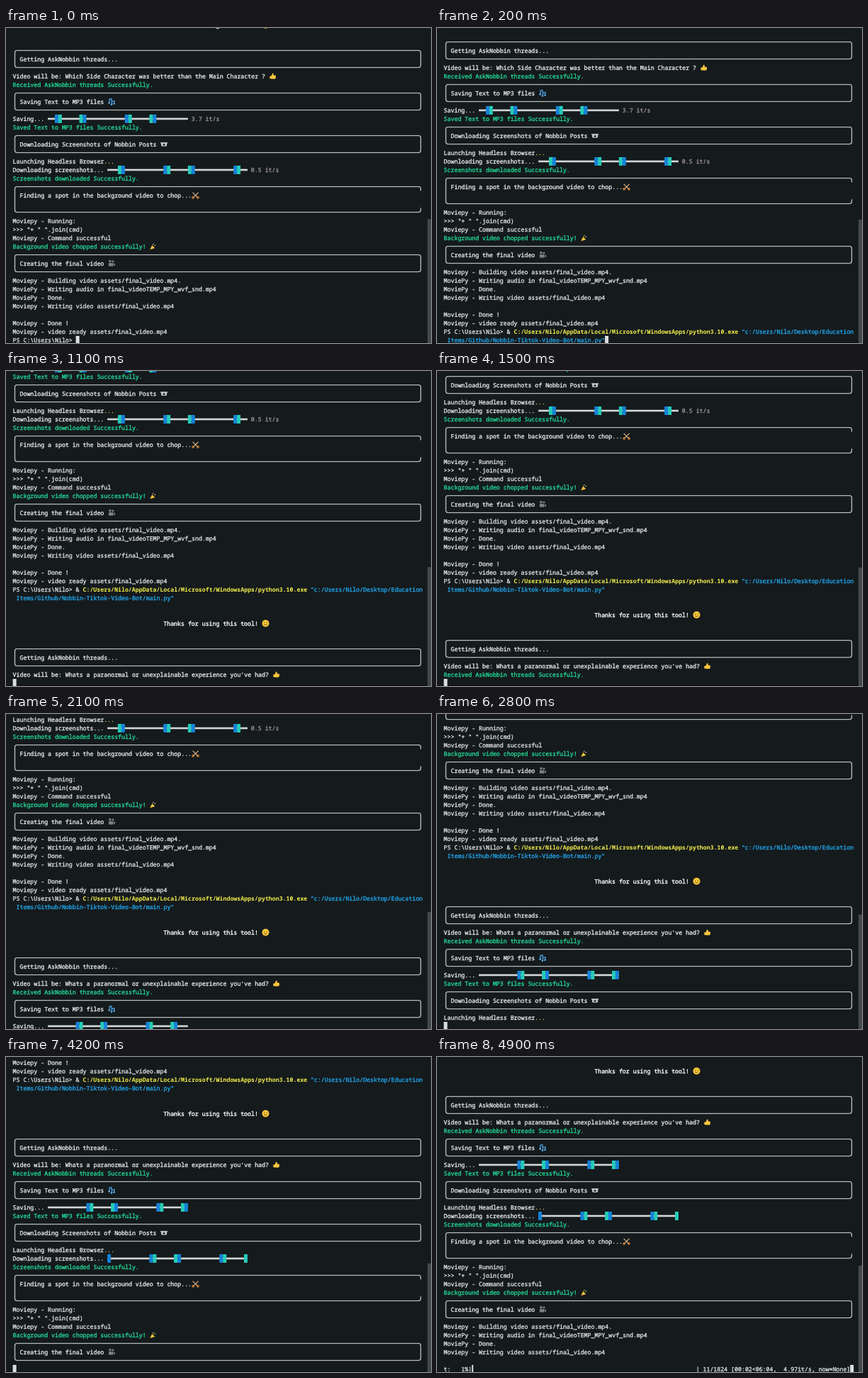
An HTML page that plays this animation: 600x444 px, repeating every 5000 ms.

```html
<!DOCTYPE html>
<html lang="en">
<head>
<meta charset="utf-8">
<title>Terminal</title>
<style>
html, body { margin: 0; width: 100%; height: 100%; overflow: hidden; background: #151a1c; }
svg { display: block; width: 600px; height: 444px; }
text {
  font: 8.25px "Noto Sans Mono", "DejaVu Sans Mono", monospace;
  white-space: pre;
  text-rendering: geometricPrecision;
  fill: currentColor;
  stroke: currentColor;
  stroke-width: 0.35px;
}
.bold { font-weight: 700; stroke: none; }
</style>
</head>
<body>
<svg id="stage" viewBox="0 0 600 444"></svg>
<script>
const CW = 4.945, LH = 12, LEFT = 9.6, LAST = 36, LOOP = 5000;
const WHITE = '#e6e8e8', GREY = '#dcdfdf', GREEN = '#22d996', YELLOW = '#f2ee4a',
      BLUE = '#20a4ea', DIM = '#998f9c', GOLD = '#f8c63c';

// [time, cursor row, cursor column]; column -1 hides the cursor
const STEPS = [
  [0, 36, 18], [200, 37, 46], [300, 38, 0], [600, 43, 0], [900, 46, 0], [1100, 47, 0],
  [1400, 48, 0], [1700, 51, -1], [2300, 53, 0], [2400, 57, 0], [3700, 57, -1],
  [4000, 63, 0], [4100, 67, 0], [4200, 70, 0], [4300, 72, 0], [4600, 75, 116]
];

// Emoji, each drawn in a 10 x 10 cell
const ICONS = {
  thumb: `<path d="M1 5h2l2-4q2 0 1.300 3h3q1 3-.800 5H4L1 8.500z" fill="${GOLD}"/>`,
  notes: '<path d="M2 7V1.500l3-.500v3.500M5.500 9V4.500l3.500-.500v4" fill="none" stroke="#4d9fe0" stroke-width="1.300"/>' +
         '<g fill="#5fb0ee"><circle cx="1.700" cy="6.800" r="1.300"/><circle cx="5" cy="9" r="1.300"/><circle cx="8.500" cy="8" r="1.300"/></g>',
  photo: '<path d="M0 2.500h10v1.500h-1v3.500q-4 1.500-8 0V4H0z" fill="#c9cdcd"/><circle cx="5" cy="5.800" r="1.700" fill="#30383b"/>',
  blades: '<path d="M1 1l7 7M9 1L2 8" stroke="#d8b98a" stroke-width="1.200"/>' +
          '<g fill="none" stroke="#e08a35" stroke-width="1.200"><circle cx="1.600" cy="8.300" r="1.200"/><circle cx="8.400" cy="8.300" r="1.200"/></g>',
  party: `<path d="M0 9.500L3 3.500l4 4z" fill="${GOLD}"/><path d="M4 3l1-2M6 4l2-1" stroke="#e8d9a0"/>`,
  film: '<g fill="#7b8284"><circle cx="3" cy="2" r="1.800"/><circle cx="7" cy="2.200" r="1.500"/><path d="M1 4.500h6.500V9H1zM8 6l2-1.300v4L8 7.500z"/></g>',
  smile: `<circle cx="5" cy="5" r="5" fill="${GOLD}"/><path d="M2.700 6q2.300 3 4.600 0M2.800 3.800h1.200M6 3.800h1.200" fill="none" stroke="#6b4a12"/>`
};

const colX = c => LEFT + c * CW;
const rowY = r => 8 + LH * r;
const esc = s => s.replace(/&/g, '&amp;').replace(/</g, '&lt;');
let body = '';

const add = (row, html) => { body += `<g data-row="${row}">${html}</g>`; };
const text = (r, c, s, color = GREY, cls = '') =>
  `<text class="${cls}" x="${colX(c)}" y="${rowY(r) + 2.6}" color="${color}">${esc(s)}</text>`;
const icon = (r, c, name) =>
  `<g transform="translate(${colX(c) + 0.8} ${rowY(r) - 5.2})">${ICONS[name]}</g>`;

function line(r, s, color, name, cls, c = 0) {
  add(r, text(r, c, s, color, cls) + (name ? icon(r, c + s.length, name) : ''));
}

function panel(r, s, name, open) {
  const y = rowY(r - 1) - 0.4;
  const shape = open
    ? `<path d="M585.500 ${y + 6}v-3q0-3-3-3H15.500q-3 0-3 3v30q0 3 3 3H582.500q3 0 3-3v-3"`
    : `<rect x="12.500" y="${y}" width="573" height="24" rx="3"`;
  add(r, shape + ' fill="none" stroke="#b4b9b9" stroke-width="1.4"/>');
  line(r, s, WHITE, name, '', 2);
}

// Pulsing track, 40 cells with a pattern of 20
function track(r, c, shift) {
  let out = `<rect x="${colX(c)}" y="${rowY(r) - 1.3}" width="${40 * CW}" height="2.6" fill="#d4d8d8"/>`;
  for (let i = 0; i < 40; i++) {
    const k = (i - shift + 40) % 20;
    const color = k === 0 || k === 12 ? '#1682d8' : k === 13 || k === 19 ? '#25cbb8' : '';
    if (color) out += `<rect x="${colX(c + i)}" y="${rowY(r) - 6}" width="${CW}" height="12" fill="${color}"/>`;
  }
  return out;
}

function bar(r, label, id, shift, rate) {
  const c = label.length;
  line(r, label, WHITE);
  add(r, `<g id="${id}">${track(r, c, shift)}</g>`);
  if (rate) line(r, rate, DIM, '', '', c + 41);
}

function run(o, id, question, shifts, rates) {
  line(o - 1, 'Thanks for using this tool! ', '#fff', 'smile', '', 43);
  panel(o + 3, 'Getting AskNobbin threads...');
  line(o + 5, `Video will be: ${question} `, WHITE, 'thumb');
  line(o + 6, 'Received AskNobbin threads Successfully.', GREEN);
  panel(o + 8, 'Saving Text to MP3 files ', 'notes');
  bar(o + 10, 'Saving... ', 'save' + id, shifts[0], rates[0]);
  line(o + 11, 'Saved Text to MP3 files Successfully.', GREEN);
  panel(o + 13, 'Downloading Screenshots of Nobbin Posts ', 'photo');
  line(o + 15, 'Launching Headless Browser', WHITE);
  line(o + 15, '...', '#e0d060', '', '', 26);
  bar(o + 16, 'Downloading screenshots... ', 'load' + id, shifts[1], rates[1]);
  line(o + 17, 'Screenshots downloaded Successfully.', GREEN);
  panel(o + 19, 'Finding a spot in the background video to chop...', 'blades', true);
  line(o + 22, 'Moviepy - Running:');
  line(o + 23, '>>> "+ " ".join(cmd)');
  line(o + 24, 'Moviepy - Command successful');
  line(o + 25, 'Background video chopped successfully! ', GREEN, 'party');
  panel(o + 27, 'Creating the final video ', 'film');
  line(o + 29, 'Moviepy - Building video assets/final_video.mp4.');
  line(o + 30, 'MoviePy - Writing audio in final_videoTEMP_MPY_wvf_snd.mp4');
  line(o + 31, 'MoviePy - Done.');
  line(o + 32, 'Moviepy - Writing video assets/final_video.mp4');
}

run(0, 'A', 'Which Side Character was better than the Main Character ?', [10, 4], ['3.7 it/s', '0.5 it/s']);
line(34, 'Moviepy - Done !');
line(35, 'Moviepy - video ready assets/final_video.mp4');
line(36, 'PS C:\\Users\\Nilo>');
add(37,
  text(36, 18, '&') +
  text(36, 20, 'C:/Users/Nilo/AppData/Local/Microsoft/WindowsApps/python3.10.exe', YELLOW, 'bold') +
  text(36, 85, '"c:/Users/Nilo/Desktop/Education', BLUE) +
  text(37, 1, 'Items/Github/Nobbin-Tiktok-Video-Bot/main.py"', BLUE));
run(41, 'B', "Whats a paranormal or unexplainable experience you've had?", [19, 0], []);
add(75, '<g id="render"></g>');

stage.innerHTML = `<rect y="443" width="595" height="1" fill="#0b0d0e"/>
  <g id="page">${body}<rect id="cursor" width="5" height="12" fill="#dcdfdf"/></g>
  <rect id="thumb" x="595" width="5" height="180" fill="#43484a"/>`;

const get = id => document.getElementById(id);
const page = get('page'), cursor = get('cursor'), slider = get('thumb');
const groups = [...page.querySelectorAll('[data-row]')];

function renderBar(t) {
  const on = t >= 4900;
  const tail = on ? '| 11/1824 [00:02<06:04,  4.97it/s, now=None]' : '| 0/1824 [00:00<?, ?it/s, now=None]';
  return text(75, 0, `t:   ${on ? 1 : 0}%|`) + text(75, 116 - tail.length, tail) +
    (on ? `<rect x="${colX(8)}" y="${rowY(75) - 6}" width="2" height="12" fill="${GREY}"/>` : '');
}

function draw() {
  const t = Math.floor(performance.now() % LOOP / 100) * 100;
  const [, row, col] = STEPS.filter(s => s[0] <= t).pop();
  const scroll = row - LAST;
  const end = row + (col !== 0);
  for (const g of groups) g.style.display = g.dataset.row < end ? '' : 'none';
  page.setAttribute('transform', `translate(0 ${-scroll * LH})`);
  slider.setAttribute('y', 269.5 + 0.63 * scroll);
  cursor.style.display = col < 0 ? 'none' : '';
  cursor.setAttribute('x', colX(col));
  cursor.setAttribute('y', rowY(row) - 6);

  const pulse = stop => (Math.floor(Math.min(0, t - stop) * 0.015) + 40) % 20;
  get('saveB').innerHTML = track(51, 10, (pulse(2300) + 19) % 20);
  get('loadB').innerHTML = track(57, 27, pulse(4000));
  get('render').innerHTML = renderBar(t);
  requestAnimationFrame(draw);
}
draw();
</script>
</body>
</html>
```
